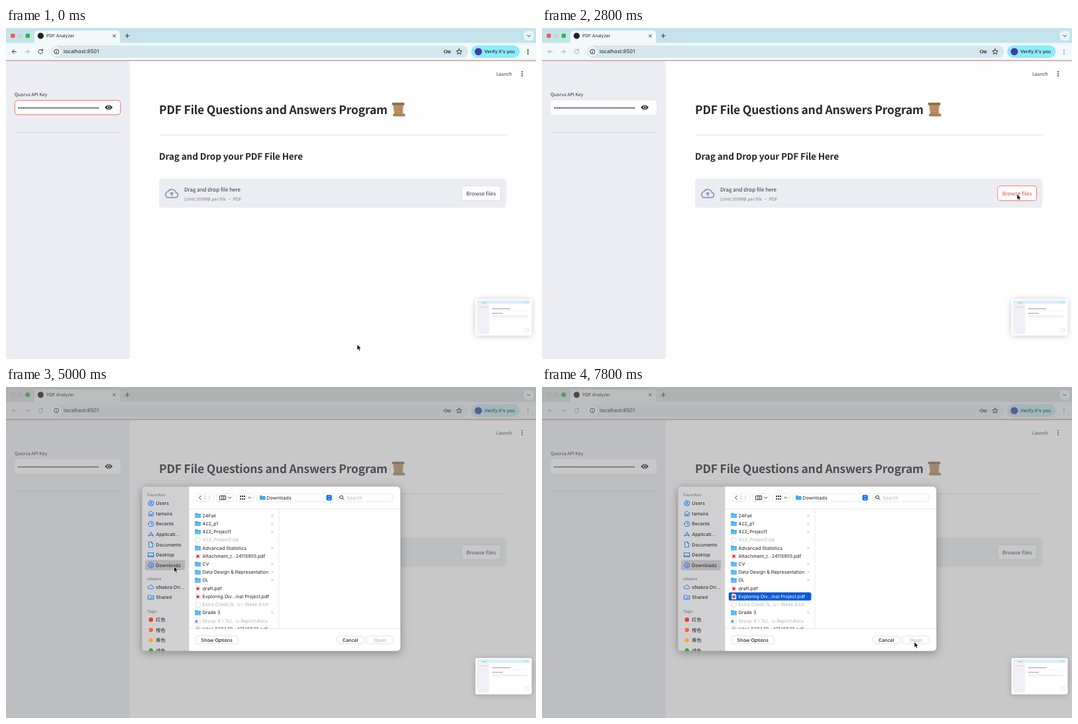
An HTML page that plays this animation: 800x500 px, repeating every 8 s.

```html
<!DOCTYPE html>
<html lang="en">
<head>
<meta charset="utf-8">
<title>PDF Analyzer</title>
<style>
  html, body { margin: 0; height: 100%; overflow: hidden; background: #fff; }
  svg { display: block; width: 800px; height: 500px; font: 7.1px Inter, sans-serif; text-rendering: geometricPrecision; }
  .page { font: 8px "Noto Sans CJK SC", "Noto Sans CJK JP", "Noto Sans CJK", "Open Sans", sans-serif; fill: #31333f; }
  .page .head { font-weight: 700; letter-spacing: -.011em; fill: #262730; }
  .page .small { font-size: 6.9px; }
  .mid { text-anchor: middle; }
  .line { fill: none; stroke: #333; stroke-width: 1; stroke-linecap: round; stroke-linejoin: round; }
  .strip { fill: #c5e3eb; }
  .bar { fill: #f1f9fb; }
  .omni { fill: #d4e8ee; }
  .chip { fill: #8eebfc; }
  .blurred .nav .line { stroke: #9aa5a9; }
  .blurred .nav .dot { fill: #9aa5a9; }
  .focused .key { stroke: #f9705f; }
  .browse rect { fill: #fff; stroke: #d6d7dc; stroke-width: .8; }
  .hover .browse rect { stroke: #fa5a4b; }
  .hover .browse text { fill: #e8443c; }
  .dim, .dialog { display: none; }
  .modal .dim, .modal .dialog { display: block; }
  .modal .strip { fill: #d2d6d9; }
  .modal .bar { fill: #eaebec; }
  .modal .omni { fill: #dfe4e7; }
  .modal .chip { fill: #b4e2ea; }
  .modal .lamp { fill: #c9cdd0; }
  .side .line { stroke: #0a72ee; stroke-width: .9; }
  .modal:not(.active) .side .entry { opacity: .55; }
  .group { font-size: 6.1px; font-weight: 600; fill: #858587; }
  .control { fill: #fff; stroke: #dedede; stroke-width: .7; }
  .button { fill: #fff; stroke: #d3d3d3; stroke-width: .7; }
  .active .stepper { fill: #0a6cf5; }
  .active .steps { stroke: #fff; }
  .faded { fill: #b3b3b3; }
</style>
</head>
<body>
<svg id="stage" viewBox="0 0 800 500" fill="#222">
  <defs>
    <clipPath id="panel"><rect x="205" y="150" width="390.5" height="249" rx="6"/></clipPath>
    <filter id="shade" x="-30%" y="-30%" width="160%" height="170%"><feDropShadow dx="0" dy="3" stdDeviation="7" flood-opacity=".32"/></filter>
    <filter id="soft" x="-30%" y="-30%" width="160%" height="170%"><feDropShadow dx="0" dy="1" stdDeviation="5" flood-opacity=".22"/></filter>
  </defs>

  <rect class="strip" width="800" height="24"/>
  <rect class="bar" y="22.5" width="800" height="27"/>
  <path class="bar" d="M39 23Q43 23 43 19V9Q43 4 48 4H167Q172 4 172 9V19Q172 23 176 23Z"/>
  <circle class="lamp" cx="10.3" cy="11.7" r="3.4" fill="#fb5b51"/>
  <circle class="lamp" cx="21.5" cy="11.7" r="3.2" fill="#cfd3d4" stroke="#b9c3c6" stroke-width=".5"/>
  <circle cx="32.7" cy="11.7" r="3.4" fill="#28b83e"/>
  <circle cx="52.3" cy="11.8" r="4.6"/>
  <text x="61" y="14.2" font-size="6.6">PDF Analyzer</text>
  <path class="line" d="M161.5 10L165.3 13.8M165.3 10L161.5 13.8M180.2 11.8H186.2M183.2 8.8V14.8"/>
  <rect x="781.5" y="4.5" width="15" height="14.5" rx="4.5" fill="#e6f4f8"/>
  <path class="line" d="M786.8 10.8L789 13L791.2 10.8"/>

  <rect class="omni" x="67.5" y="26.5" width="630" height="18.5" rx="9.2"/>
  <circle cx="76.2" cy="35.7" r="7" fill="#f4fafb"/>
  <path class="line" stroke-width=".8" d="M72.5 35.7a3.6 3.6 0 1 0 7.2 0a3.6 3.6 0 1 0-7.2 0M76.1 35.5V37.5M76.1 33.9V34"/>
  <text x="87" y="38.4" font-size="7.8">localhost:8501</text>
  <path class="line" d="M661.3 35.7a2.2 2.2 0 1 0 4.4 0a2.2 2.2 0 1 0-4.4 0M665.8 34.8H670.8V36.8H666M668.8 37V38.2"/>
  <path class="line" stroke-width=".9" d="M684 31.6L685.2 34.4L688.1 34.6L685.9 36.6L686.6 39.4L684 37.9L681.4 39.4L682.1 36.6L679.9 34.6L682.8 34.4Z"/>
  <rect class="chip" x="702" y="26.3" width="73.5" height="18.7" rx="9.3"/>
  <circle cx="713" cy="35.7" r="5.5" fill="#443a9e"/>
  <text x="722" y="38.3" font-size="7" font-weight="500">Verify it's you</text>
  <g class="nav">
    <path class="line" d="M15.5 35.7H9.3M12 33L9.3 35.7L12 38.4M55 33.7A3.3 3.3 0 1 0 55.5 36.6M55.3 31.8V34.2H52.9"/>
    <path class="line" style="stroke:#a9b1b4" d="M29 35.7H35.2M32.5 33L35.2 35.7L32.5 38.4"/>
    <path class="dot" d="M787 32h1.7v1.7h-1.7zM787 35h1.7v1.7h-1.7zM787 38h1.7v1.7h-1.7z"/>
  </g>

  <g class="page">
    <rect y="49" width="800" height="451" fill="#fefefe"/>
    <rect y="49" width="187" height="451" fill="#ebedf3"/>
    <rect y="48.7" width="800" height="1" fill="#bb7571"/>
    <text class="small" x="13" y="102.7">Quorva API Key</text>
    <rect class="key" x="13.3" y="109.3" width="159.6" height="21.6" rx="4" fill="#fff"/>
    <path d="M19 120.7H140" fill="none" stroke="#262730" stroke-width="1.9" stroke-linecap="round" stroke-dasharray="0 2.45"/>
    <path d="M149 120Q155 112.6 161 120Q155 127.4 149 120Z" fill="#262730"/>
    <circle cx="155" cy="120" r="2.2" stroke="#fff"/>
    <path d="M13 157.8H173" stroke="#c8cad2" stroke-width=".8"/>
    <path d="M231 161.8H755.5" stroke="#d9dade" stroke-width=".8"/>
    <text class="small" x="740" y="71.5">Launch</text>
    <path d="M778.2 65.3h1.7v1.7h-1.7zM778.2 68.3h1.7v1.7h-1.7zM778.2 71.3h1.7v1.7h-1.7z"/>
    <text class="head" x="231" y="130" font-size="17.5">PDF File Questions and Answers Program</text>
    <path d="M584 114H600L599 132H586Z" fill="#c69c6d"/>
    <path d="M586 119H598M586.5 122H598M587 125H598M587 128H598" stroke="#94704a" stroke-width="1"/>
    <rect x="582.5" y="112.7" width="19" height="4" rx="1.6" fill="#8d6d49"/>
    <rect x="584" y="129.4" width="18.5" height="4" rx="1.6" fill="#a98055"/>
    <text class="head" x="231" y="199" font-size="13.6">Drag and Drop your PDF File Here</text>
    <rect x="231" y="227.8" width="524.5" height="43.8" rx="4.5" fill="#ebedf3"/>
    <path d="M245 256.2a4.6 4.6 0 0 1-.5-9.1a6.2 6.2 0 0 1 11.4 1a4.1 4.1 0 0 1 .2 8.1ZM250.2 254V248.6M247.7 250.8L250.2 248.3L252.7 250.8"
      fill="none" stroke="#8d9abb" stroke-width="1.8" stroke-linejoin="round"/>
    <text x="269" y="246.8">Drag and drop file here</text>
    <text class="small" x="269" y="260.6" fill="#7e8089">Limit 200MB per file • PDF</text>
    <g class="browse">
      <rect x="687.8" y="238.4" width="58.8" height="22.4" rx="4.2"/>
      <text class="mid" x="717.2" y="252.5">Browse files</text>
    </g>
  </g>
  <rect class="dim" width="800" height="500" fill="rgb(128,128,128)" fill-opacity=".43"/>

  <g filter="url(#soft)"><rect x="708.7" y="409.5" width="84.6" height="54.8" rx="2" fill="#fff"/></g>
  <path d="M711 411.5H791V416.5H711Z" fill="#daf0f5"/>
  <path d="M711 416.5H729.5V462H711Z" fill="#f0f1f6"/>
  <path d="M781 413.5H789V415.5H781Z" fill="#a5e9f6"/>
  <path d="M718 415H726" stroke="#8b9a9e" stroke-width=".7"/>
  <path d="M713 421.5H727" stroke="#f3c3be" stroke-width=".8"/>
  <path d="M734 424H761M734 431H750" stroke="#777" stroke-width="1.1" stroke-dasharray="2 .6"/>
  <path d="M734 427.4H787" stroke="#e4e5e9" stroke-width=".5"/>
  <rect x="734" y="433.8" width="53" height="3.6" fill="#f0f1f6"/>
  <rect x="782" y="452" width="8.5" height="7" fill="#f4f5f7"/>

  <g class="dialog">
    <rect x="205" y="150" width="390.5" height="249" rx="6" fill="#fff" filter="url(#shade)"/>
    <g clip-path="url(#panel)">
      <rect x="205" y="150" width="71" height="249" fill="#d0d0d2"/>
      <g class="side" id="side"></g>
      <g id="files"></g>
      <rect x="276.3" y="365" width="320" height="34" fill="#fff"/>
      <path d="M276.2 150V399M276.2 184.4H596M276.2 365H596M412 184.4V365" fill="none" stroke="#dedede" stroke-width=".7"/>
    </g>
    <rect x="205" y="150" width="390.5" height="249" rx="6" fill="none" stroke="#9a9a9a" stroke-width=".5"/>
    <rect class="control" x="287" y="161.3" width="26.5" height="11.8" rx="2.5"/>
    <rect class="control" x="317.5" y="161.3" width="25.5" height="11.8" rx="2.5"/>
    <rect class="control" x="347.8" y="161.3" width="25.5" height="11.8" rx="2.5"/>
    <rect class="control" x="378.5" y="161.3" width="115" height="11.8" rx="2.5"/>
    <rect class="control" x="499.5" y="161.3" width="84.5" height="11.8" rx="2.5"/>
    <path class="line" id="back" d="M294.3 164.3L291.6 167.2L294.3 170.1"/>
    <path class="line" style="stroke:#c4c4c4" d="M305.8 164.3L308.5 167.2L305.8 170.1M300.2 164V170.5"/>
    <path class="line" d="M323 164.4H331.6V170H323ZM325.9 164.4V170M328.8 164.4V170M336 166.4L337.7 168.2L339.4 166.4M366 166.4L367.7 168.2L369.4 166.4"/>
    <path class="line" stroke-dasharray="2 1" style="stroke-width:2;stroke-linecap:butt" d="M353 165H361.5M353 169.2H361.5"/>
    <path d="M383 163.8h3.2l1 1H391.6V170.6H383Z" fill="#42a9ea"/>
    <text id="place" x="393.3" y="169.7"></text>
    <rect class="stepper" x="483.6" y="163" width="8.2" height="8.4" rx="2" fill="#fff"/>
    <path class="line steps" d="M486.2 166L487.7 164.5L489.2 166M486.2 168.4L487.7 169.9L489.2 168.4"/>
    <path class="line" d="M503.7 166.5a2.5 2.5 0 1 0 5 0a2.5 2.5 0 1 0-5 0M508.1 168.4L510.2 170.5"/>
    <text class="faded" x="514.3" y="169.7">Search</text>
    <rect class="button" x="286.8" y="376" width="63.2" height="12" rx="3"/>
    <rect class="button" x="499.6" y="376" width="40.4" height="12" rx="3"/>
    <rect class="button" x="544.3" y="376" width="40.4" height="12" rx="3"/>
    <g class="mid" font-weight="500">
      <text x="318.2" y="384.5">Show Options</text>
      <text x="519.8" y="384.5">Cancel</text>
      <text class="faded" x="564.5" y="384.5">Open</text>
    </g>
  </g>

  <g id="cursor" stroke="#fff" stroke-width=".7" stroke-linejoin="round">
    <path id="arrow" d="M0 0V8.6L2 6.8L3.4 10L4.9 9.3L3.5 6.3H6.2Z" fill="#000"/>
    <path id="hand" d="M0 1Q.9 0 1.8 1V4L5.6 4.8Q6.4 5 6.2 6L5.5 10H.8L-2.2 6.4Q-1.8 5.2-.6 6L0 6.5Z" fill="#fff" stroke="#111" stroke-width=".9"/>
  </g>
</svg>
<script>
const LOOP = 8000, TICK = 200;
const $ = id => document.getElementById(id);
const stage = $("stage");

const ring = "M-4 0a4 4 0 1 0 8 0a4 4 0 1 0-8 0";
const sideRows = [
  ["Users", 175.5, ring + "M-2.6 2.8a3 3 0 0 1 5.2 0M-1.4-1a1.4 1.4 0 1 0 2.8 0a1.4 1.4 0 1 0-2.8 0"],
  ["tamsira", 191.1, "M-4 0L0-4L4 0M-3-.6V3.6H3V-.6M-.9 3.4V1H.9V3.4"],
  ["Recents", 206.8, ring + "M0-2.4V0H1.8"],
  ["Applicati...", 222.4, "M-3.4 3.5L0-3.5L3.4 3.5M-4 1.4H4"],
  ["Documents", 238, "M-2.8-4H.8L2.8-2V4H-2.8ZM.8-4V-2H2.8"],
  ["Desktop", 253.6, "M-4-3H4V3H-4ZM-4 1.4H4"],
  ["Downloads", 269.2, ring + "M0-2V2M-1.6.5L0 2L1.6.5"],
  ["oNebra Dri...", 302.2, "M-2.5 2.6a2 2 0 0 1-.2-4a3 3 0 0 1 5.6 .6a1.8 1.8 0 0 1 0 3.4Z"],
  ["Shared", 317.8, "M-4-3H-1L0-2H4V3H-4ZM-1.8 1.6a2 2 0 0 1 3.6 0"],
];
const tags = [["红色", "#f23b30"], ["橙色", "#fb6a33"], ["黄色", "#f5a72c"], ["绿色", "#18b52a"]];

// Kinds: D folder, P PDF, W document, R script, F other file
const home = `D Applications|F bash_profile|R case2.Rmd|D d2l-zh|D Desktop|D docker_comp...mysql_tomcat|D Documents|D Downloads|D oNebra Drive (Archive)|F java_error_in...ns_client.hprof|D llvm|F matlab_crash_dump.47264-1|F matlab_crash_dump.90700-1|F matlab_crash_dump.91854-1|F matlab_crash_dump.92486-1`;
const downloads = `D 24Fall|D 422_p1|D 422_Project1|F 422_Project1.zip|D Advanced Statistics|P Attachment_t...24115955.pdf|D CV|D Data Design &amp; Representation|D DL|P draft.pdf|P Exploring Div...inal Project.pdf|F Extra Credit Q...s – Week 4.txt|D Grade 3|W Group 9 – SU...is Report.docx|P label_830440...d31d8645.pdf`;

const sheet = '<path d="M286.5-4H291L293-2V4H286.5Z" fill="#fff" stroke="#c9c9c9" stroke-width=".6"/>';
const icons = {
  D: '<path d="M285.3-3.6H288.6L289.6-2.6H294V3.6H285.3Z" fill="#3ba3e8"/><path d="M285.3-1.4H294V3.6H285.3Z" fill="#62bdf3"/>',
  P: sheet + '<rect x="287.6" y="-1.6" width="4" height="4" fill="#d8352b"/>',
  W: sheet + '<rect x="285.5" y="-1" width="4" height="4" fill="#7f9fdc"/>',
  R: sheet + '<circle cx="289.7" cy=".4" r="2" fill="#d98a8a"/>',
  F: sheet,
};

function fileList(list, selected) {
  return list.split("|").map((entry, i) => {
    const kind = entry[0], on = i === selected;
    const tone = on ? 'fill="#fff"' : "DP".includes(kind) ? "" : 'class="faded"';
    return `<g transform="translate(0 ${194.2 + i * 12.22})">
      ${on ? '<rect x="281.8" y="-6.1" width="124.6" height="12.2" rx="2.5" fill="#0b5bd7"/>' : ""}${icons[kind]}
      <text x="296.5" y="2.5" ${tone}>${entry.slice(2)}</text>
      ${kind === "D" ? '<path class="line" style="stroke:#999;stroke-width:.8" d="M401-1.7L402.6 0L401 1.7"/>' : ""}</g>`;
  }).join("");
}

function sidebar(selected) {
  const group = (name, y) => `<text class="group" x="213" y="${y}">${name}</text>`;
  const entry = (name, y, icon) => `<g class="entry" transform="translate(218.8 ${y})">${icon}<text x="7.5" y="2.5">${name}</text></g>`;
  const y = sideRows.find(row => row[0] === selected)[1];
  return `<rect x="210" y="${y - 7.6}" width="60" height="15.2" rx="3" fill="#b2b2b5"/>`
    + group("Favorites", 165.3) + group("oNebra", 292.2) + group("Tags", 341.2)
    + sideRows.map(([name, y, d]) => entry(name, y, `<path class="line" d="${d}"/>`)).join("")
    + tags.map(([name, color], i) =>
      entry(`<tspan font-family="Noto Sans CJK SC, Noto Sans CJK JP, sans-serif">${name}</tspan>`, 351.5 + i * 15.5, `<circle r="3.2" fill="${color}"/>`)).join("");
}

// Cursor stops: time, x, y
const path = [
  [0, 530, 478], [200, 530, 478], [400, 717, 251], [2800, 717, 251], [3000, 686, 306],
  [4000, 249, 252], [4400, 249, 252], [4600, 253.5, 271], [5400, 253.5, 271],
  [6200, 345, 314], [6800, 345, 314], [7600, 562, 385], [LOOP, 562, 385],
];
function cursorAt(t) {
  const i = path.findIndex(stop => stop[0] > t);
  const [t0, x0, y0] = path[i - 1], [t1, x1, y1] = path[i];
  const p = (t - t0) / (t1 - t0), e = p * p * (3 - 2 * p);
  return [x0 + (x1 - x0) * e, y0 + (y1 - y0) * e];
}

let last = -1;
function draw() {
  const t = Math.floor(performance.now() % LOOP / TICK) * TICK;
  if (t !== last) {
    last = t;
    const opened = t >= 4800, overButton = t >= 400 && t < 3200;
    const flags = { focused: t < 2800, blurred: t >= 2800, hover: overButton, modal: t >= 3000, active: t >= 3200 };
    for (const name in flags) stage.classList.toggle(name, flags[name]);
    const place = opened ? "Downloads" : "tamsira";
    $("place").textContent = place;
    $("side").innerHTML = sidebar(place);
    $("files").innerHTML = fileList(opened ? downloads : home, t >= 6600 ? 10 : -1);
    $("back").style.stroke = opened ? "#333" : "#bbb";
    const pointing = overButton && t < 2800;
    $("hand").style.display = pointing ? "" : "none";
    $("arrow").style.display = pointing ? "none" : "";
    $("cursor").setAttribute("transform", `translate(${cursorAt(t)})`);
  }
  requestAnimationFrame(draw);
}
draw();
</script>
</body>
</html>
```
